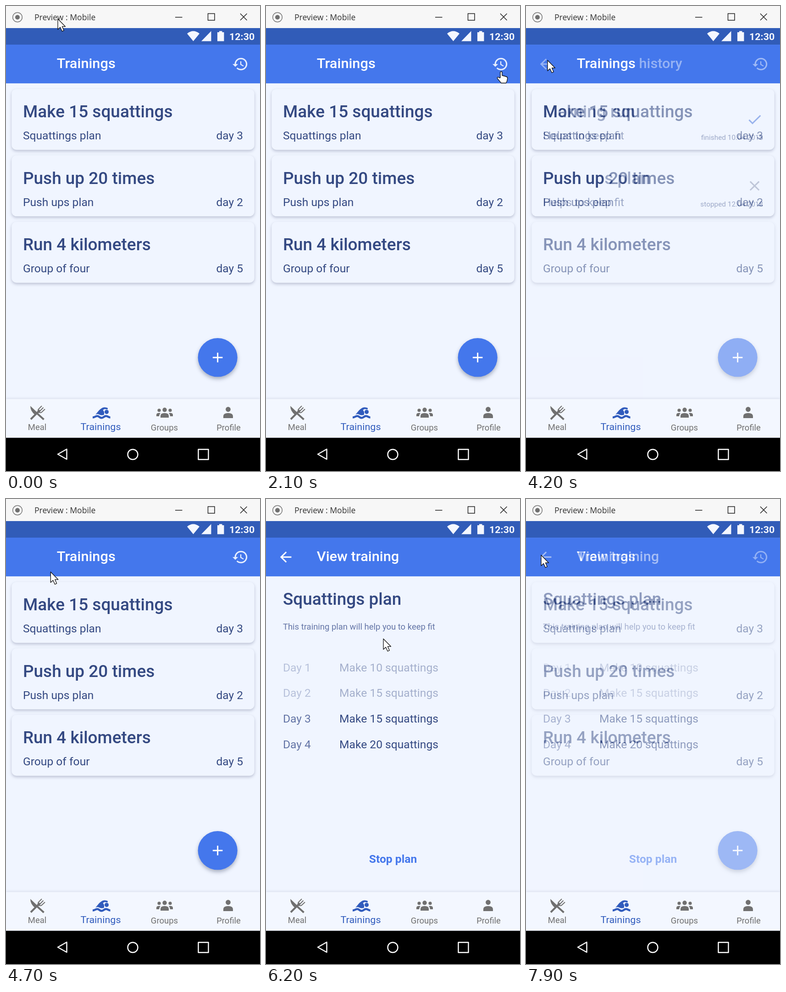
Animation of 554 by 1011 pixels, one loop 8 s. Source, as an HTML page:

```html
<!DOCTYPE html>
<html lang="en">
<head>
<meta charset="utf-8">
<title>Trainings</title>
<style>
  html, body { margin: 0; height: 100%; overflow: hidden; background: #f0f5ff; }
  svg { display: block; width: 100vw; height: 100vh; }
  text { font-family: Roboto, sans-serif; font-size: 16px; fill: #344982; white-space: pre; }
  .bar { font-size: 20px; font-weight: 500; fill: #fff; }
  .big { font-size: 24px; font-weight: 500; }
  .note { font-size: 10px; }
  .desc { font-size: 12px; fill: #6475a6; }
  .day { fill: #6475a6; }
  .past { opacity: .4; }
  .stop { font-weight: 700; fill: #4477ec; text-anchor: middle; }
  .end { text-anchor: end; }
  .clock { font-size: 14px; font-weight: 700; fill: #f4f7ff; }
  .tab { font-size: 12px; fill: #707070; text-anchor: middle; }
  .active { font-size: 14px; fill: #315cbd; }
  .card { fill: #f0f5ff; filter: drop-shadow(0 2px 2px rgba(50, 60, 100, .27)); }
  .fab { fill: #4477ec; filter: drop-shadow(0 3.3px 2.7px rgba(40, 50, 80, .36)); }
  .tabs { fill: #f3f7ff; filter: drop-shadow(0 -.7px 1.3px rgba(60, 70, 110, .13)); }
  .line { fill: none; stroke: #222; stroke-width: 1.5; }
  .keys { fill: none; stroke: #fff; stroke-width: 2.4; stroke-linejoin: round; }
  .pointer path { fill: #fff; stroke: #111; stroke-width: 1.3; stroke-linejoin: round; }
</style>
</head>
<body>
<svg viewBox="0 0 554 1011" preserveAspectRatio="none">
  <!-- window bar -->
  <rect width="554" height="49" fill="#f7f7f7"/>
  <circle cx="25" cy="24.5" r="10.3" class="line" style="stroke:#777"/>
  <circle cx="25" cy="24.5" r="5" fill="#707070"/>
  <text x="62" y="31" style="font:17.6px 'Open Sans',sans-serif;fill:#333">Preview : Mobile</text>
  <path class="line" d="M369 24.5h15.5M440.5 16.5h14.5v14.5h-14.5zM511 16.5l14.5 14.5M525.5 16.5l-14.5 14.5"/>

  <!-- phone of 360 x 640 units -->
  <g transform="translate(0 48) scale(1.5389 1.5047)">
    <rect width="360" height="24" fill="#315cb8"/>
    <text class="clock" x="316.4" y="17">12:30</text>
    <g id="base"></g>
    <g id="top"></g>
    <rect class="tabs" y="536" width="360" height="56"/>
    <text class="tab" x="44.2" y="581">Meal</text>
    <text class="tab active" x="134.2" y="581">Trainings</text>
    <text class="tab" x="224.5" y="581.5">Groups</text>
    <text class="tab" x="315.5" y="581.5">Profile</text>
    <rect y="592" width="360" height="48"/>
  </g>

  <!-- status icons -->
  <path fill="#f4f7ff" d="M395 60Q408.5 49 422 60L408.5 76.5ZM426 76.5h21.5v-22zM461 57h4v-2.5h6.5v2.5h4v19.5h-14.5z"/>

  <!-- tab icons -->
  <g fill="none" stroke="#707070" stroke-width="4">
    <path d="M54 898.5L72 880.5M67 885L82.5 899"/>
    <path fill="#707070" stroke="none" d="M53 869.5L69 884.5L63.5 889Q53 881 53 869.5Z"/>
    <path stroke-width="2" d="M78 869.5L70.5 877Q69 881 71.5 883Q74 885 77.5 883.5L85 876.5M81.5 873L74 880.5"/>
    <path stroke-width="5" d="M69.5 883.5L74 879"/>
  </g>
  <g fill="#315cbd">
    <path d="M195 888.5L203 879Q205 877 209 874.3Q212 872 216 872.5L221 873.5Q223 875.5 221 877.3L215 876.3L211.5 878.3L214 882.5V888.5Q209 891 204 888.5Q199 885.5 195 888.5Z"/>
    <circle cx="219.5" cy="882.5" r="4.5"/>
    <path fill="none" stroke="#315cbd" stroke-width="4.5" d="M189 894.5c5 0 6-3 10-3s5 4 9.5 4 5-4 9.5-4 5 3 9.5 3"/>
  </g>
  <g fill="#707070">
    <circle cx="346" cy="878" r="4.7"/><circle cx="334" cy="879" r="3.6"/><circle cx="358" cy="879" r="3.6"/>
    <path d="M337 895v-4q0-6 9-6t9 6v4zM328 892v-3q0-5 9-4-3 3-3 7zM364 892v-3q0-5-9-4 3 3 3 7z"/>
    <circle cx="484.5" cy="877" r="5.4"/>
    <path d="M474 896v-4q0-7 10.5-7t10.5 7v4z"/>
  </g>

  <!-- system keys -->
  <path class="keys" d="M113 974.5L132.5 963.5V985.5ZM419.5 964H441.5V986H419.5Z"/>
  <circle class="keys" cx="276.5" cy="975" r="11"/>

  <g id="cursor" class="pointer">
    <path id="arrow" d="M0 0V23L5.3 18.3L9.3 27L13.3 25.2L9.5 16.7H16.5Z"/>
    <path id="hand" d="M-2 14V3c0-3.500 4-3.500 4 0v6l9 2.500c2 .5 3 2 2.700 4.500l-1 5-2 4.500H0L-8 16c-2-3 1.500-4.500 3.500-2z"/>
  </g>
</svg>
<script>
const $ = id => document.getElementById(id);
const text = (cls, x, y, s) => `<text class="${cls}" x="${x}" y="${y}">${s}</text>`;
const icon = (x, y, d, fill = '#fff') =>
  `<path transform="translate(${x} ${y})" fill="${fill}" d="${d}"/>`;

const clock = icon(320, 40, 'M13 3c-4.97 0-9 4.03-9 9H1l3.89 3.89.07.14L9 12H6c0-3.87 3.13-7 7-7s7 3.13 7 7-3.13 7-7 7c-1.93 0-3.68-.79-4.94-2.06l-1.42 1.42C8.27 19.99 10.51 21 13 21c4.97 0 9-4.03 9-9s-4.03-9-9-9zm-1 5v5l4.28 2.54.72-1.21-3.5-2.08V8H12z', '#e6eeff');
const back = icon(16, 40, 'M20 11H7.83l5.59-5.59L12 4l-8 8 8 8 1.41-1.41L7.83 13H20z');
const check = icon(312, 120, 'M9 16.17L4.83 12l-1.42 1.41L9 19 21 7l-1.41-1.41z', '#2b5fd6');
const cross = icon(312, 216, 'M19 6.41L17.59 5 12 10.59 6.41 5 5 6.41 10.59 12 5 17.59 6.41 19 12 13.41 17.59 19 19 17.59 13.41 12z', '#808aa8');

const screen = (title, body) =>
  `<rect y="24" width="360" height="56" fill="#4477ec"/>
   <rect y="80" width="360" height="460" fill="#f0f5ff"/>` + text('bar', 72, 57.7, title) + body;

const card = (i, title, plan, note, cls = '') => {
  const y = 88 + 96 * i;
  return `<rect class="card" x="8" y="${y}" width="344" height="88" rx="7"/>` +
    text('big', 24, y + 41, title) + text('', 24, y + 73, plan) +
    text('end ' + cls, 336, y + (cls ? 73.6 : 73), note);
};

const row = (i, task) => {
  const y = 217 + 37 * i;
  return `<g class="${i < 2 ? 'past' : ''}">` +
    text('day', 24, y, 'Day ' + (i + 1)) + text('', 104, y, task) + '</g>';
};

const screens = {
  home: screen('Trainings', clock +
    card(0, 'Make 15 squattings', 'Squattings plan', 'day 3') +
    card(1, 'Push up 20 times', 'Push ups plan', 'day 2') +
    card(2, 'Run 4 kilometers', 'Group of four', 'day 5') +
    `<circle class="fab" cx="300" cy="476" r="28"/>
     <path d="M293 476h14M300 469v14" stroke="#fff" stroke-width="1.9"/>`),
  past: screen('Trainings history', back +
    card(0, 'Morning run', 'Helps to keep fit', 'finished 10.04.2018', 'note') + check +
    card(1, 'Push ups plan', 'Helps to keep fit', 'stopped 12.04.2018', 'note') + cross),
  plan: screen('View training', back +
    text('big', 24, 121, 'Squattings plan') +
    text('desc', 24, 157, 'This training plan will help you to keep fit') +
    [10, 15, 15, 20].map((n, i) => row(i, `Make ${n} squattings`)).join('') +
    text('stop', 180, 494, 'Stop plan'))
};

// [start ms, screen]
const fades = [[-999, 'home'], [2150, 'past'], [4060, 'home'], [5605, 'plan'], [7780, 'home']];
const FADE = 250, LOOP = 8000, STEP = 100;

// [ms, x, y] of the pointer tip
const path = [[0, 113, 28], [900, 300, 325], [1100, 304, 330], [1400, 304, 330], [2000, 513, 142],
  [2300, 513, 142], [3000, 293, 185], [3900, 47, 118], [4300, 47, 118], [5300, 190, 233],
  [5700, 190, 233], [6200, 256, 304], [6800, 344, 768], [7000, 344, 768], [7700, 33, 122], [8000, 33, 122]];

function pointerAt(t) {
  const i = path.findIndex(p => p[0] > t);
  const [t0, x0, y0] = path[i - 1], [t1, x1, y1] = path[i];
  const u = (t - t0) / (t1 - t0), k = u * u * (3 - 2 * u);
  return [x0 + (x1 - x0) * k, y0 + (y1 - y0) * k];
}

function draw(t) {
  const n = fades.filter(f => f[0] <= t).length - 1;
  const [start, name] = fades[n];
  $('base').innerHTML = screens[fades[Math.max(0, n - 1)][1]];
  $('top').innerHTML = screens[name];
  $('top').setAttribute('opacity', Math.min(1, (t - start) / FADE));
  const hover = t >= 1900 && t < 2400;
  $('arrow').style.display = hover ? 'none' : '';
  $('hand').style.display = hover ? '' : 'none';
  $('cursor').setAttribute('transform', `translate(${pointerAt(t)})`);
}

let begin, last = -1;
function tick(now) {
  begin ??= now;
  const t = Math.floor((now - begin) % LOOP / STEP) * STEP;
  if (t !== last) draw(last = t);
  requestAnimationFrame(tick);
}
draw(0);
requestAnimationFrame(tick);
</script>
</body>
</html>
```
